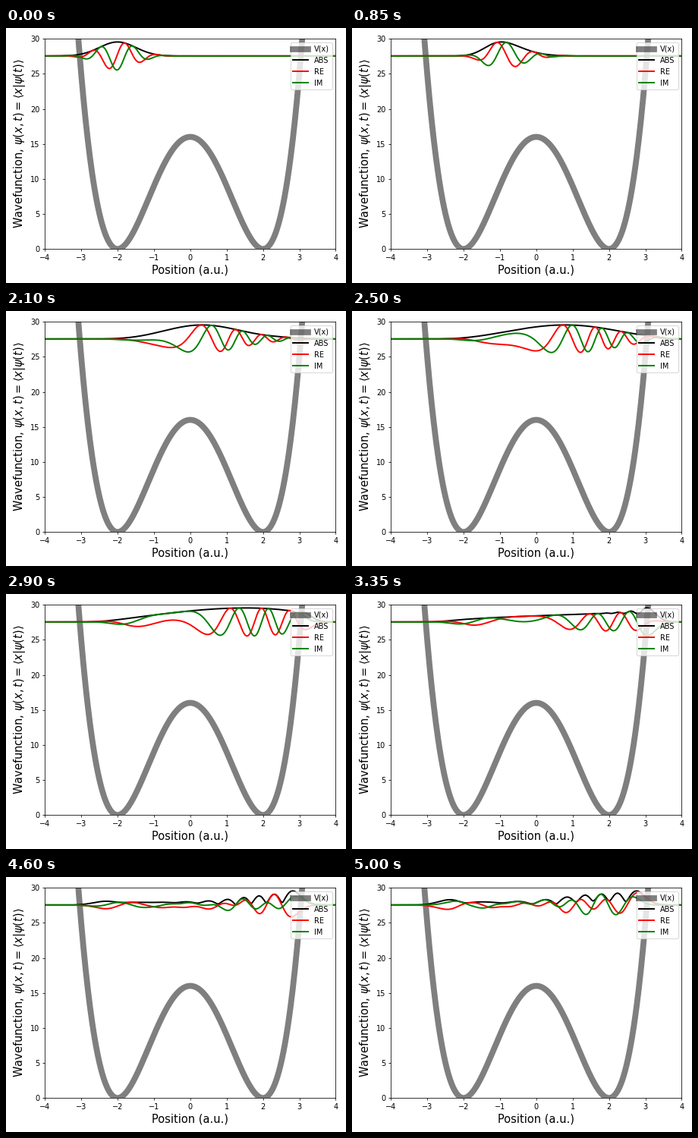
Recreate the animation shown at these times as a matplotlib script. Size 448 px wide and 336 px high, loop 5.05 s.

```python
import numpy as np
import matplotlib.pyplot as plt
from matplotlib.animation import FuncAnimation

W, H, DPI = 448, 336, 70
FRAMES, INTERVAL = 101, 50
DT = 0.01          # atomic time units per frame
X0, P0 = -2.0, 7.0  # initial centre and momentum of the packet
HEIGHT = 2.0       # drawn height of the largest amplitude


def potential(x):
    return (x**2 - 4)**2


def hamiltonian(x):
    """Sinc-basis Hamiltonian on an even grid (unit mass)."""
    h = x[1] - x[0]
    n = np.arange(len(x))
    d = n[:, None] - n[None, :]
    sign = 1.0 - 2.0 * (d % 2)
    kinetic = sign / (h**2 * np.where(d == 0, 1, d)**2)
    np.fill_diagonal(kinetic, np.pi**2 / (6 * h**2))
    return kinetic + np.diag(potential(x))


x = np.linspace(-4, 4, 401)
ham = hamiltonian(x)
levels, states = np.linalg.eigh(ham)

start = np.exp(-2 * (x - X0)**2 + 1j * P0 * x)
start /= np.linalg.norm(start)
coeffs = states.T @ start
energy = np.sum(levels * np.abs(coeffs)**2)


def wave(t):
    psi = states @ (coeffs * np.exp(-1j * levels * t))
    return HEIGHT * psi / np.abs(psi).max()


plt.rcParams["font.family"] = "DejaVu Sans"
fig, ax = plt.subplots(figsize=(W / DPI, H / DPI), dpi=DPI)
fig.subplots_adjust(left=51.2 / W, right=434.4 / W,
                    bottom=1 - 291.2 / H, top=1 - 14.2 / H)

ax.plot(x, potential(x), color="black", alpha=0.5, lw=8, label="V(x)")
parts = [("ABS", "black", np.abs), ("RE", "red", np.real), ("IM", "green", np.imag)]
lines = [ax.plot([], [], color=color, lw=2, label=name)[0] for name, color, _ in parts]

ax.set_xlim(-4, 4)
ax.set_ylim(0, 30)
ax.set_xlabel("Position (a.u.)", fontsize=15)
ax.set_ylabel(r"Wavefunction, $\psi(x,t)=\langle x|\psi(t)\rangle$", fontsize=15)
ax.legend(loc="upper right", fontsize=10)


def update(frame):
    psi = wave(frame * DT)
    for line, (_, _, part) in zip(lines, parts):
        line.set_data(x, energy + part(psi))
    return lines


anim = FuncAnimation(fig, update, frames=FRAMES, interval=INTERVAL,
                     repeat=True, repeat_delay=0, blit=False)
plt.show()
```
